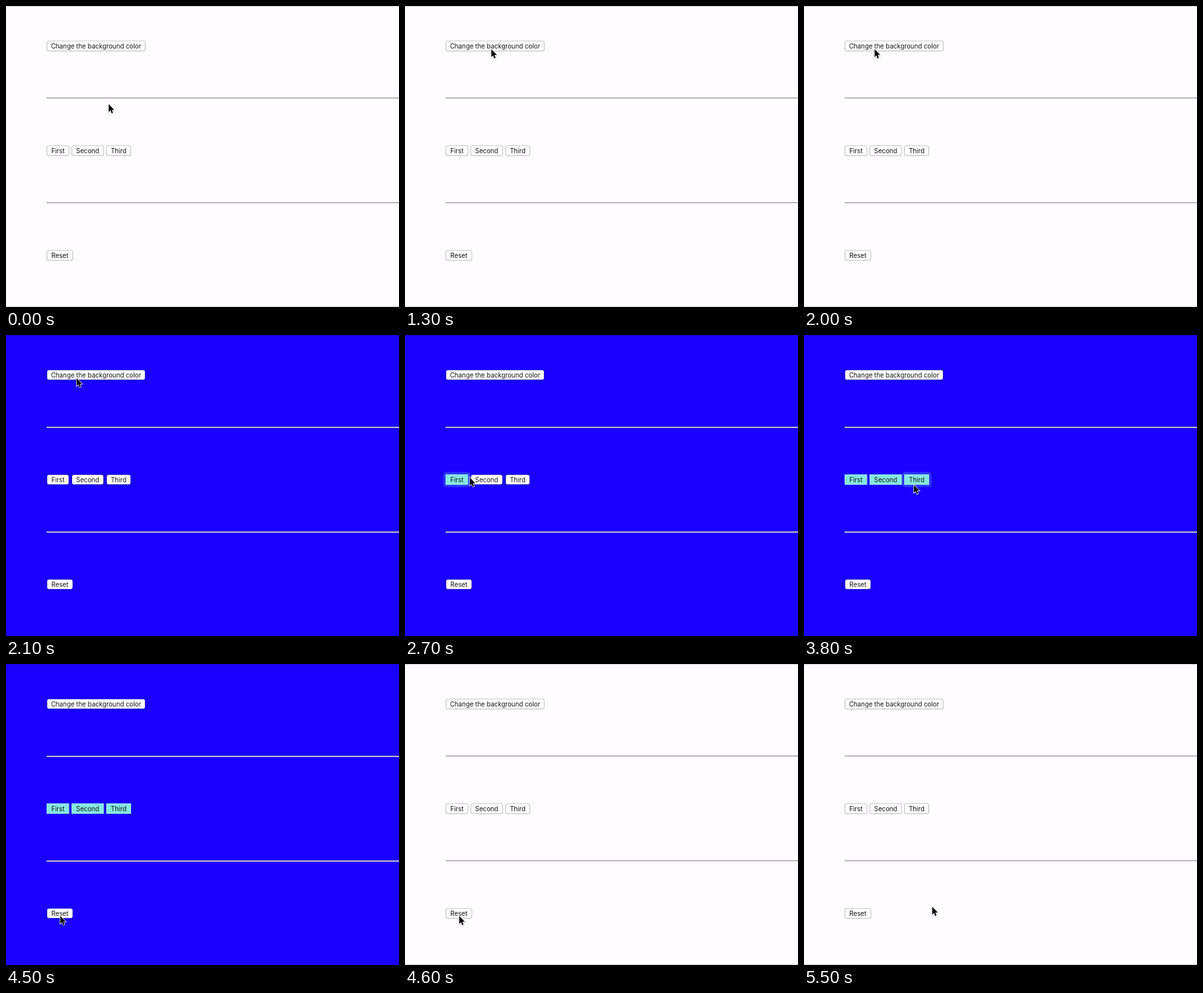
Write an HTML page that moves like this. It is 600 px wide and 460 px high and loops after 6400 ms.

```html
<!DOCTYPE html>
<html lang="en">
<head>
<meta charset="utf-8">
<style>
  html, body { margin: 0; width: 600px; height: 460px; overflow: hidden; }
  svg { display: block; cursor: default; }
  text { font: 9.8px Inter, Roboto, sans-serif; text-anchor: middle; }
</style>
</head>
<body>
<svg id="stage" width="600" height="460">
  <defs>
    <linearGradient id="pressed" x2="0" y2="1">
      <stop stop-color="#69b0fa"/><stop offset="1" stop-color="#0f69f0"/>
    </linearGradient>
  </defs>
  <rect id="page" width="600" height="460"/>
  <rect width="600" height="1" opacity=".17"/>
  <rect id="foot" y="459" width="600" height="1" opacity=".17"/>
  <g id="rules"></g>
  <g id="buttons"></g>
  <g id="pointer">
    <path d="M0 0V13.6L3.1 10.8 5.2 15.8 7.4 14.9 5.3 10H9.6Z" transform="translate(.8 1) scale(.88)"
      stroke="#fff" stroke-width="1.6" paint-order="stroke"
      style="filter:drop-shadow(0 1px 1px rgba(0,0,0,.25))"/>
  </g>
</svg>
<script>
const LOOP = 6400, TICK = 100;
const LEFT = 62, TOP = 53, PITCH = 160, GAP = 3.5, HEIGHT = 16;
const BLUE_ON = 21, BLUE_OFF = 46;
const $ = id => document.getElementById(id);
const rect = (x, y, w, h, attrs) => `<rect x="${x}" y="${y}" width="${w}" height="${h}" ${attrs}/>`;

// Held down for one tick from `press`; a tinted button keeps focus until `blur`
const rows = [
  [{ label: 'Change the background color', w: 151, press: 19 }],
  [{ label: 'First', w: 34.5, press: 25, blur: 31 },
   { label: 'Second', w: 49.5, press: 31, blur: 35 },
   { label: 'Third', w: 38, press: 35, blur: 44 }],
  [{ label: 'Reset', w: 40.5, press: 44 }]
];

// The pointer rests between moves; `bend` is the control point of a curve
const origin = [156, 149];
const moves = [
  { from: 0, till: 2, to: [167, 156], bend: [163, 97] },
  { from: 3, till: 5, to: [97, 367] },
  { from: 6, till: 13, to: [131, 65], bend: [234, -100] },
  { from: 15, till: 18, to: [107, 65] },
  { from: 21, till: 25, to: [82, 217] },
  { from: 26, till: 29, to: [145, 217] },
  { from: 29, till: 31, to: [128, 219] },
  { from: 32, till: 35, to: [172, 219] },
  { from: 37, till: 44, to: [82, 384] },
  { from: 46, till: 49, to: [157, 375] },
  { from: 50, till: 55, to: [195, 370] }
];

const ease = u => u * u * (3 - 2 * u);
const mix = (a, b, u) => a.map((v, i) => v + (b[i] - v) * u);

function pointerAt(n) {
  let at = origin;
  for (const { from, till, to, bend } of moves) {
    if (n <= from) break;
    const u = ease(Math.min(1, (n - from) / (till - from)));
    at = bend ? mix(mix(at, bend, u), mix(bend, to, u), u) : mix(at, to, u);
  }
  return at;
}

function plainBox(x, y, w, down) {
  return rect(x, y, w, HEIGHT + .3, 'rx="3.6" opacity=".28"') +
    rect(x + .9, y + .8, w - 1.8, HEIGHT - 1.6, `rx="2.8" fill="${down ? 'url(#pressed)' : '#fffeff'}"`);
}

function tintedBox(x, y, w, focused) {
  const ring = rect(x - 1.5, y - 1.5, w + 3, HEIGHT + 3,
    'rx="2.5" fill="none" stroke="#4b9bf0" stroke-width="4" opacity=".36"');
  return (focused ? ring : '') +
    rect(x, y, w, HEIGHT, 'fill="#a3b8c4"') +
    rect(x, y, w - .5, HEIGHT - .5, 'fill="#b4e3e4"') +
    rect(x + .5, y + .5, w - 1, HEIGHT - 1, 'fill="#84e8e0"');
}

function button({ label, w, press, blur }, x, y, n) {
  const down = n === press;
  const tinted = blur && n > press && n < BLUE_OFF;
  const box = tinted ? tintedBox(x, y, w, n < blur) : plainBox(x, y, w, down);
  return `${box}<text x="${x + w / 2}" y="${y + 11.6}" fill="${down ? '#fff' : '#151515'}">${label}</text>`;
}

function buttonRow(row, i, n) {
  let x = LEFT;
  return row.map(b => {
    const html = button(b, x, TOP + i * PITCH, n);
    x += b.w + GAP;
    return html;
  }).join('');
}

function draw(n) {
  const blue = n >= BLUE_ON && n < BLUE_OFF;
  $('page').setAttribute('fill', blue ? '#1a00ff' : '#fffdff');
  $('foot').style.display = blue ? 'none' : '';
  $('buttons').innerHTML = rows.map((row, i) => buttonRow(row, i, n)).join('');
  $('pointer').setAttribute('transform', `translate(${pointerAt(n)})`);
}

$('rules').innerHTML = [140, 300].map(y =>
  rect(LEFT, y, 538, 1, 'fill="#8e8d91"') + rect(LEFT, y + 1, 538, 1, 'fill="#ebeaec"')).join('');

let last = -1;
const start = performance.now();
function frame(now) {
  const n = Math.floor(Math.max(0, now - start) % LOOP / TICK);
  if (n !== last) draw(last = n);
  requestAnimationFrame(frame);
}
frame(start);
</script>
</body>
</html>
```
